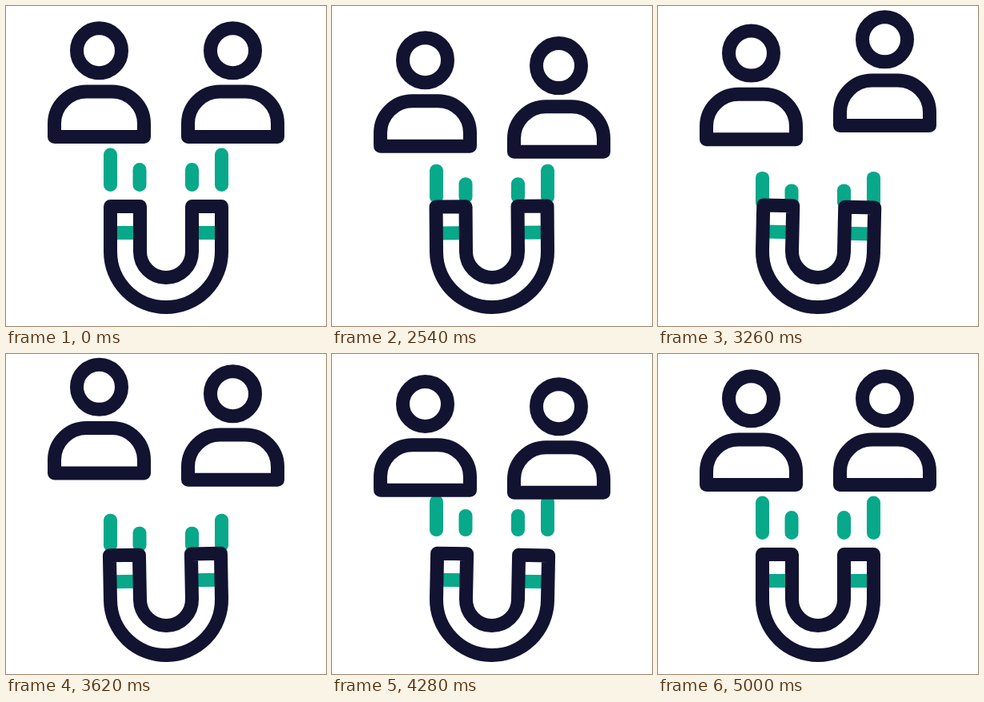
These frames come from a looping animation (400 by 400 pixels, 5030 ms). An HTML page:

```html
<!DOCTYPE html>
<html lang="en">
<head>
<meta charset="utf-8">
<title>Audience magnet</title>
<style>
  html, body { margin: 0; width: 100%; height: 100%; overflow: hidden; background: #fff; }
  svg { display: block; width: 100%; height: 100%; }
  .line { fill: none; stroke: #121331; stroke-width: 17; stroke-linejoin: round; }
  .green { fill: #08a88a; }
  .ray { fill: none; stroke: #08a88a; stroke-width: 17; stroke-linecap: round; }
</style>
</head>
<body>
<svg viewBox="0 0 400 400">
  <defs>
    <g id="person" class="line">
      <circle cx="116.5" cy="55.8" r="28"/>
      <path d="M60.5 163.4V147A40 40 0 0 1 100.5 107H132.5A40 40 0 0 1 172.5 147V163.4Z"/>
    </g>
  </defs>

  <g id="rays">
    <path class="ray" d="M130.5 186V223.5M167 204.5V223.5M232.5 204.5V223.5M269.5 186V223.5"/>
  </g>

  <g id="left"><use href="#person"/></g>
  <g id="right"><use href="#person" x="167"/></g>

  <g id="magnet">
    <path class="green" d="M134 275H164V292H134ZM236 275H266V292H236Z"/>
    <path class="line" d="M130.5 250.5H167.5V307A32.5 32.5 0 0 0 232.5 307V250.5H269.5V307A69.5 69.5 0 0 1 130.5 307Z"/>
  </g>
</svg>
<script>
  const LOOP = 5.03, REST = 2.03, LEAD = 2, LENGTH = 3;
  const smooth = u => u * u * (3 - 2 * u);
  const sineOut = u => Math.sin(u * Math.PI / 2);

  // Eases through [time, value] points; the first stretch may have its own easing.
  function track(points, firstEase = smooth) {
    return t => {
      const i = points.findIndex(([time]) => time > t);
      if (i < 1) return points[i ? points.length - 1 : 0][1];
      const [t0, a] = points[i - 1], [t1, b] = points[i];
      const ease = i === 1 ? firstEase : smooth;
      return a + (b - a) * ease((t - t0) / (t1 - t0));
    };
  }

  const leftY = track([[0, 0], [.92, 18.8], [1.635, -14.5], [2.465, 9.8], [LENGTH, 0]]);
  const rightY = track([[0, 0], [.54, 18.8], [1.32, -14.5], [2.1, 11], [LENGTH, 0]]);
  const pull = track([[0, 2.5], [1.2, 21], [2.66, -9], [LENGTH, 0]], sineOut);
  const squash = track([[0, 0], [1.2, .16], [2.66, .03], [LENGTH, 0]], sineOut);
  const shake = t => -1.3 * Math.sin(2 * Math.PI * 3.8 * t) * Math.min(1, (LENGTH - t) / .2);

  const [rays, left, right, magnet] =
    ["rays", "left", "right", "magnet"].map(id => document.getElementById(id));
  const place = (el, transform) => el.setAttribute("transform", transform);

  function draw() {
    const now = performance.now() / 1000 % LOOP;
    // The first REST seconds show the same pose as the end.
    const t = now < REST ? LENGTH : Math.min(now - LEAD, LENGTH);
    place(left, `translate(0 ${leftY(t)})`);
    place(right, `translate(0 ${rightY(t)})`);
    place(rays, `translate(0 ${232 + pull(t)}) scale(1 ${1 - squash(t)}) translate(0 -232)`);
    place(magnet, `rotate(${shake(t)} 200 307)`);
    requestAnimationFrame(draw);
  }
  draw();
</script>
</body>
</html>
```
